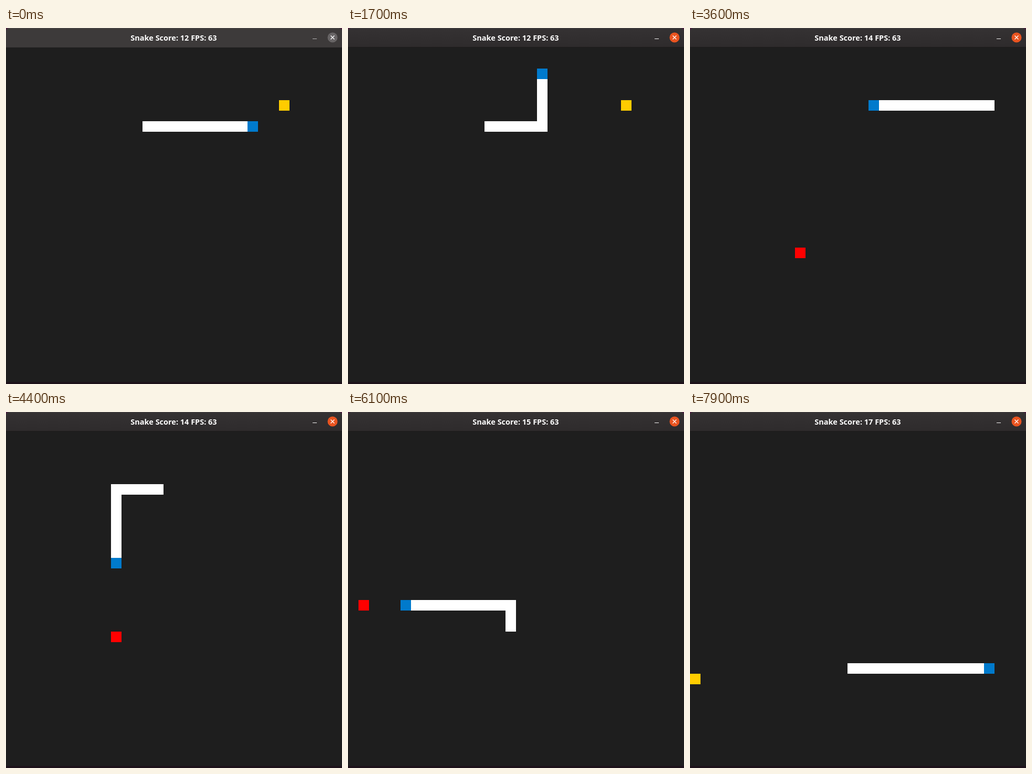
These frames come from a looping animation (640 px wide and 676 px high, 8000 ms). An HTML page:

```html
<!DOCTYPE html>
<html lang="en">
<head>
<meta charset="utf-8">
<title>Snake</title>
<style>
  html, body { margin: 0; width: 100%; height: 100%; overflow: hidden; background: #1e1e1e; }
  svg { display: block; }
  text { font: 700 14.5px "Open Sans", "Noto Sans", sans-serif; fill: #fff; }
  .bar { fill: url(#active); }
  .edge { fill: #1d1b1b; }
  .close { fill: #e95420; }
  .minus { fill: #fff; }
  .idle .bar { fill: #3d3a3a; }
  .idle .edge { fill: #3a3737; }
  .idle .close { fill: #676465; }
  .idle .minus { fill: #b5b4b4; }
</style>
</head>
<body>
<svg id="stage" width="640" height="676" viewBox="0 0 640 676">
  <defs>
    <linearGradient id="active" x2="0" y2="1">
      <stop stop-color="#353233"/>
      <stop offset="1" stop-color="#2e2b2c"/>
    </linearGradient>
  </defs>
  <rect width="640" height="676" fill="#1e1e1e"/>
  <rect width="640" height="10" fill="#4d163f"/>
  <path class="bar" d="M0 37V6Q0 0 6 0H634Q640 0 640 6V37z"/>
  <rect x="5" width="630" height="1" fill="#fff" opacity=".07"/>
  <rect class="edge" y="36" width="640" height="1"/>
  <rect y="672" width="640" height="4" fill="#1d121a"/>
  <text id="title" x="319.5" y="24" text-anchor="middle"></text>
  <rect class="minus" x="584" y="20" width="8" height="1"/>
  <circle class="close" cx="622" cy="18" r="9.5"/>
  <path d="M618.5 14.5l7 7m0-7l-7 7" stroke="#fff" stroke-width="1.4"/>
  <g shape-rendering="crispEdges">
    <path id="food"/>
    <path id="body" fill="#fff"/>
    <path id="head" fill="#007acc"/>
  </g>
</svg>
<script>
const $ = id => document.getElementById(id);
const LOOP = 8000, TICK = 100, COLS = 32, TAIL = 10;

// The snake's route as direction and number of cells; step 0 comes TAIL cells in.
const DIRS = { R: [1, 0], L: [-1, 0], U: [0, -1], D: [0, 1] };
const route = [[13, 7]];
for (const leg of 'R37 U6 R7 D8 R3 U4 L18 D18 R5 U7 L14 D6 R30'.split(' ')) {
  const [dx, dy] = DIRS[leg[0]];
  for (let i = +leg.slice(1); i--;) {
    const [x, y] = route.at(-1);
    route.push([(x + dx + COLS) % COLS, y + dy]);
  }
}

// [time, steps taken]
const pace = [[0, 0], [900, 17], [1800, 34], [2600, 48], [2700, 50], [3600, 66],
  [4500, 82], [5200, 97], [6300, 117], [7000, 130], [7900, 150], [8000, 152]];

// Each meal shows until the head has passed the given step.
const meals = [
  { cell: [26, 5], color: '#fc0', eaten: 57 },
  { cell: [10, 19], color: '#f00', eaten: 87 },
  { cell: [1, 16], color: '#f00', eaten: 117 },
  { cell: [0, 23], color: '#fc0', eaten: Infinity }
];

// [time, score, fps]
const titles = [[0, 12, 63], [500, 12, 62], [1500, 12, 63], [3500, 14, 63],
  [5500, 15, 63], [6500, 17, 62], [7500, 17, 63]];

const square = ([x, y]) => `M${x * 20} ${37 + y * 20}h20v20h-20z`;

function stepAt(t) {
  const i = pace.findIndex(p => p[0] > t);
  const [t0, s0] = pace[i - 1], [t1, s1] = pace[i];
  return Math.round(s0 + (s1 - s0) * (t - t0) / (t1 - t0));
}

function draw(t) {
  const step = stepAt(t);
  const eaten = meals.filter(m => step > m.eaten).length;
  const head = step + TAIL;
  const meal = meals[eaten];
  $('food').setAttribute('d', square(meal.cell));
  $('food').setAttribute('fill', meal.color);
  $('body').setAttribute('d', route.slice(head - TAIL - eaten, head).map(square).join(''));
  $('head').setAttribute('d', square(route[head]));
  const [, score, fps] = titles.findLast(e => e[0] <= t);
  $('title').textContent = `Snake Score: ${score} FPS: ${fps}`;
  $('stage').classList.toggle('idle', t < 100);
}

const start = performance.now();
function frame() {
  const t = (performance.now() - start) % LOOP;
  draw(Math.floor(t / TICK) * TICK);
  requestAnimationFrame(frame);
}
frame();
</script>
</body>
</html>
```
